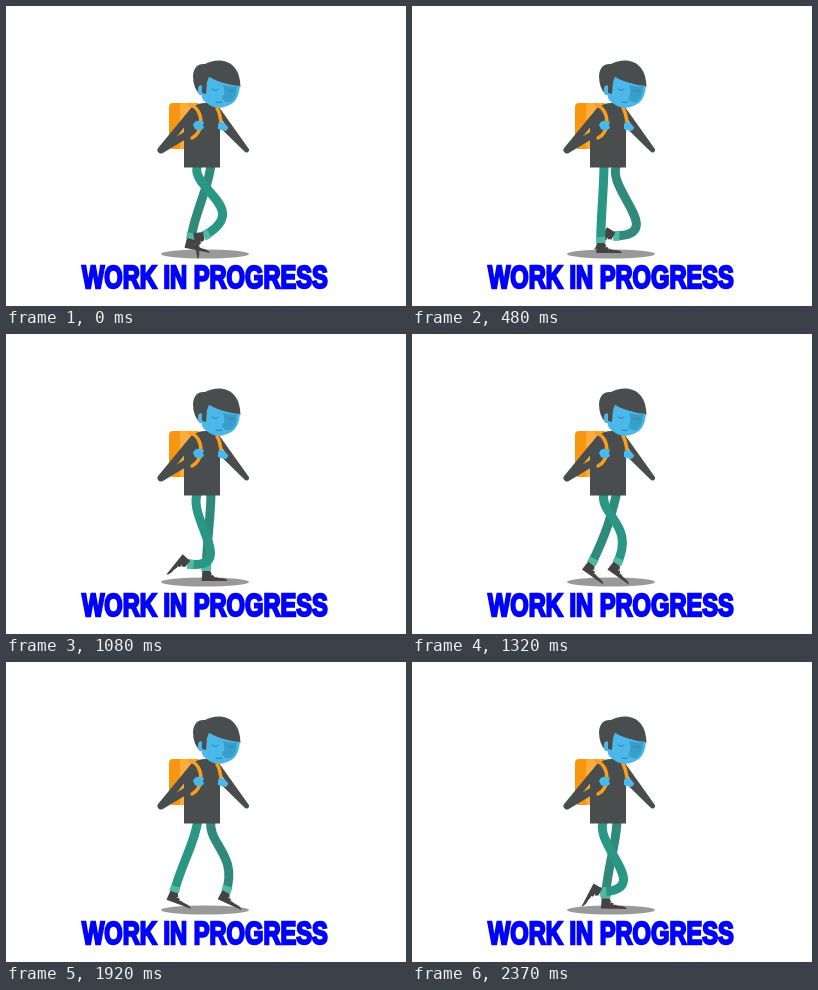
An HTML page for the animation above (2.43 s loop, 400 by 300 pixels).

```html
<!DOCTYPE html>
<html lang="en">
<head>
<meta charset="utf-8">
<title>Work in progress</title>
<style>
  html, body { margin: 0; width: 100%; height: 100%; overflow: hidden; background: #fff; }
  svg { display: block; width: 100vw; height: 100vh; }
  .dark { fill: #4a4d4d; }
  .skin { fill: #4ab9ea; }
  .line { fill: none; stroke-linecap: round; stroke-linejoin: round; }
  text { font: bold 32px "Liberation Sans", Arial, sans-serif; fill: #00f; stroke: #00f; stroke-width: 2.4; }
</style>
</head>
<body>
<svg viewBox="0 0 400 300">
  <defs>
    <g id="shoe">
      <path fill="#454244" d="M-4 0H4Q6 6 13 7Q20 7 21.500 10H-4.500Z"/>
      <path class="line" stroke="#fff" stroke-width=".8" d="M5 4L8 2.500M8 6L11 4.500"/>
    </g>
  </defs>
  <ellipse cx="199" cy="248" rx="44" ry="4.500" fill="#999"/>
  <g id="legs"></g>

  <rect x="163" y="97" width="32" height="46" rx="4" fill="#f7960f"/>
  <path fill="#fcac3c" d="M174 97H190V143H174Z"/>
  <path class="dark" d="M178 161.500V112L186 102Q192 97 199 97H208Q214 98 214 106V161.500Z"/>
  <path class="line" stroke="#4a4d4d" stroke-width="7" d="M188 104L155 144L190 123"/>
  <path class="line" stroke="#4a4d4d" stroke-width="5" d="M212 104L240.500 144L218 122"/>
  <path class="line" stroke="#f99d1c" stroke-width="3.500" d="M184 98.500Q195 103 195 117Q194 128 186 132M211 102Q214 107 215 117"/>
  <path class="skin" d="M187 119Q189 114 194 115L198 116L197 119L198 122Q194 126 189 123ZM212 118Q215 114 218 117L222 121Q222 125 218 125L212 123Z"/>

  <path class="dark" d="M194 89Q187 82 187 70Q188 57 199 58Q206 54 215 54.500Q234 57 234.500 81L203 84Z"/>
  <path class="skin" d="M200 69Q213 78 234 80Q233 92 227 97Q213 106 202 98Q196 95 195.500 89Q191 88 192 82Q193 78 197 80Z"/>
  <path class="dark" d="M196 68H204L201 76L200 88L196 87Z"/>
  <path fill="#389fca" d="M217 79Q224 81 231 80Q231 93 225 96Q218 97 216 92Q220 88 217 79Z"/>
  <path class="line" stroke="#2c83ab" stroke-width="1" d="M206 83Q209 86 212 83M222 84Q225 87 228 84M210 96Q213 97 216 96"/>
  <text transform="translate(76 281.500) scale(.74 1)">WORK IN PROGRESS</text>
</svg>
<script>
const FRAME = 30, FRAMES = 80, LOOP = 2430, CYCLE = 41;
const HIP_Y = 158, GROUND_Y = 237, STRIDE = 22;
const rad = degrees => degrees * Math.PI / 180;

function makeLeg(hipX, centerX, offset, color) {
  const group = document.createElementNS("http://www.w3.org/2000/svg", "g");
  group.innerHTML = `<path fill="none" stroke="${color}" stroke-width="9"/>
    <path fill="none" stroke="#50b9a3" stroke-width="9.500"/><use href="#shoe"/>`;
  document.getElementById("legs").append(group);
  const [trouser, cuff, shoe] = group.children;
  return { hipX, centerX, offset, trouser, cuff, shoe };
}

// The heel rolls up through the swing; the toe tips up briefly as the foot lands
function shoeAngle(phase) {
  const swing = ((phase + .6) % 1) / .78;
  const roll = swing < 1 ? 130 * Math.sin(Math.PI * swing ** 1.3) ** 2 : 0;
  const landing = 22 * Math.exp(-(((phase - .2) / .06) ** 2));
  return roll - landing;
}

function drawLeg({ hipX, centerX, offset, trouser, cuff, shoe }, time) {
  const phase = (time + offset) % 1;
  const stride = STRIDE * Math.cos(2 * Math.PI * (phase - .16));
  const angle = shoeAngle(phase);
  const x = centerX + stride;
  const y = GROUND_Y - 7 * Math.min(1, Math.max(0, angle / 20));

  // The calf leans with the shoe, and bows out more as the foot comes forward
  const lean = rad(angle * .75);
  const dx = Math.sin(lean), dy = -Math.cos(lean);
  const reach = 27 + Math.max(0, dx) * (28 + .6 * stride);
  const thighX = hipX - 13 * dx;

  trouser.setAttribute("d",
    `M${hipX} ${HIP_Y}C${thighX} ${HIP_Y + 24} ${x + dx * reach} ${y + dy * reach} ${x} ${y}`);
  cuff.setAttribute("d", `M${x} ${y}l${dx * 6} ${dy * 6}`);
  shoe.setAttribute("transform", `translate(${x} ${y}) rotate(${angle})`);
}

const legs = [
  makeLeg(205, 200, .53, "#2f8a7b"),
  makeLeg(192, 186, 0, "#2a9684")
];
const start = performance.now();

function draw() {
  const elapsed = (performance.now() - start) % LOOP;
  const step = Math.min(FRAMES - 1, Math.floor(elapsed / FRAME));
  legs.forEach(leg => drawLeg(leg, step % CYCLE / CYCLE));
  requestAnimationFrame(draw);
}
draw();
</script>
</body>
</html>
```
